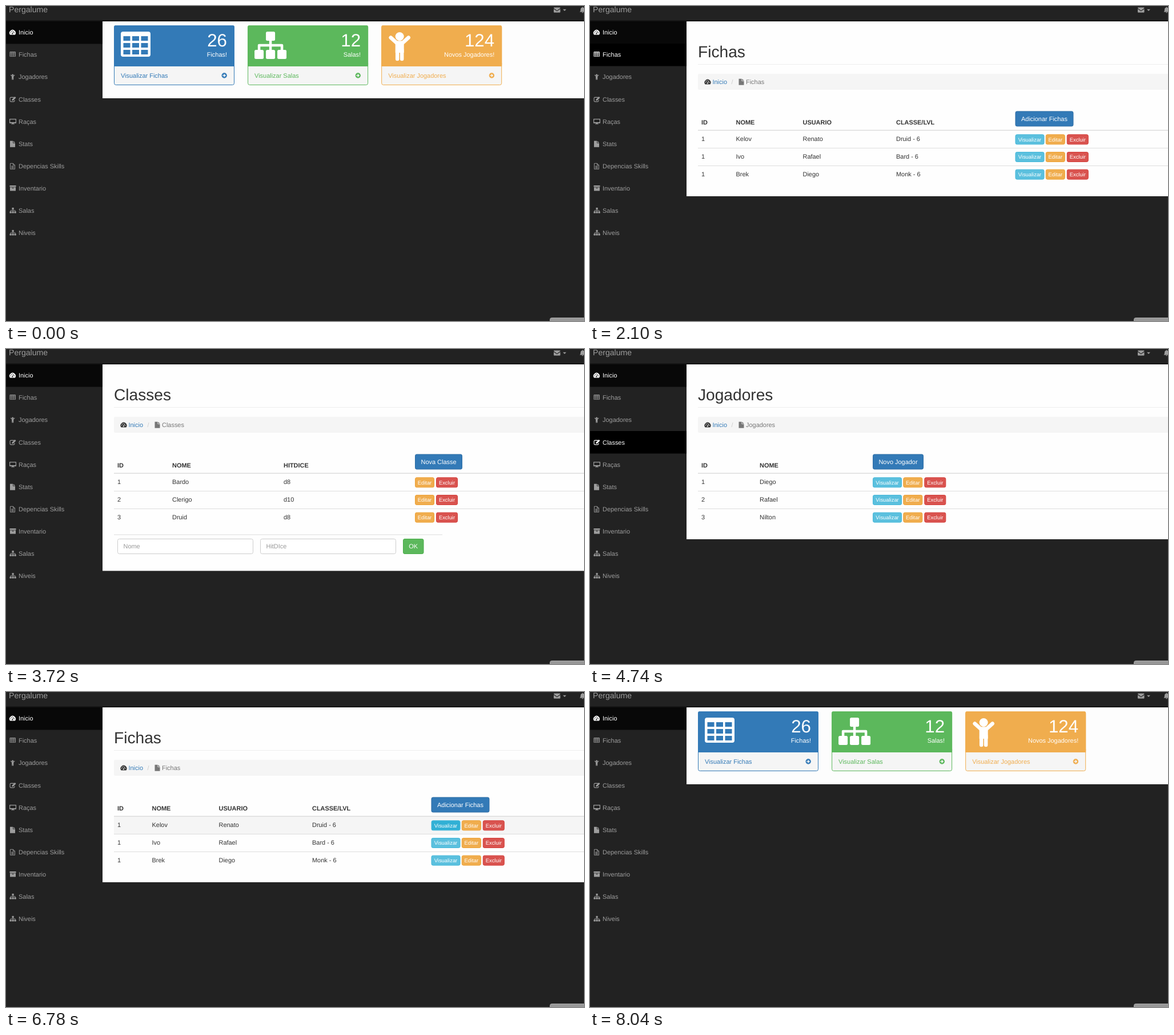
An HTML page that plays this animation: 1012 px wide and 553 px high, repeating every 8820 ms.

```html
<!DOCTYPE html>
<html lang="pt">
<head>
<meta charset="utf-8">
<title>Painel</title>
<style>
  html, body { margin: 0; width: 100%; height: 100%; overflow: hidden; background: #222; }
  svg { display: block; width: 1012px; height: 553px; font-family: "Liberation Sans", Arial, sans-serif; text-rendering: geometricPrecision; }
</style>
</head>
<body>
<svg id="stage" viewBox="0 0 1012 553"></svg>
<script>
const LOOP = 8820;
const BASE = 10.95;
const BLUE = '#337ab7', GREEN = '#5cb85c', ORANGE = '#f0ad4e';

// Each step changes only the listed parts of the state.
const timeline = [
  [0, { page: 'home', hover: -1, row: -1, button: '' }],
  [660, { hover: 2 }],
  [840, { hover: 1 }],
  [2100, { page: 'sheets' }],
  [2160, { hover: 2 }],
  [2880, { page: 'players', hover: 3 }],
  [3720, { page: 'classes', hover: -1 }],
  [4140, { hover: 3 }],
  [4260, { hover: 2 }],
  [4740, { page: 'players', hover: 3 }],
  [4920, { hover: -1 }],
  [5160, { button: 'add' }],
  [5280, { button: '' }],
  [5520, { hover: 3 }],
  [5580, { hover: 2 }],
  [5700, { hover: 1 }],
  [6300, { page: 'sheets', hover: -1, row: 0 }],
  [6540, { button: 'view' }],
  [6720, { button: 'pressed' }],
  [6780, { button: 'view' }],
  [7020, { page: 'detail', row: -1, button: '' }],
  [7440, { hover: 1 }],
  [7560, { hover: 0 }],
  [7920, { page: 'home' }],
  [8040, { hover: -1 }]
];

const text = (x, y, str, fill = '#333', size = BASE, extra = '') =>
  `<text x="${x}" y="${y}" fill="${fill}" font-size="${size}" ${extra}>${str}</text>`;
const rect = (x, y, w, h, fill, extra = '') =>
  `<rect x="${x}" y="${y}" width="${w}" height="${h}" fill="${fill}" ${extra}/>`;
const outlined = (x, y, w, h, fill, border, r = 3) =>
  rect(x + .5, y + .5, w - 1, h - 1, fill, `rx="${r}" stroke="${border}"`);
const CENTER = 'text-anchor="middle"', RIGHT = 'text-anchor="end"', BOLD = 'font-weight="bold"';

const dot = (x, y, r) => `M${x - r} ${y}a${r} ${r} 0 1 0 ${2 * r} 0a${r} ${r} 0 1 0 ${-2 * r} 0z`;
const shape = d => `<path fill-rule="evenodd" d="${d}"/>`;
const line = (d, w) => `<path d="${d}" fill="none" stroke="currentColor" stroke-width="${w}" stroke-linejoin="round"/>`;

function tableIcon() {
  let d = 'M4 0H48Q52 0 52 4V40Q52 44 48 44H4Q0 44 0 40V4Q0 0 4 0z';
  for (const x of [4.5, 20, 35.5]) for (const y of [8, 20, 32]) d += `M${x} ${y}h12v8h-12z`;
  return shape(d);
}

// The first three are drawn at large size; the rest are about 11 units wide.
const icons = {
  table: tableIcon(),
  sitemap: [[20, 0], [0, 32], [20, 32], [40, 32]].map(([x, y]) => rect(x, y, 16, 16, 'currentColor', 'rx="2.5"')).join('') +
    line('M28 14V34M8 34V24H48V34', 4.5),
  child: shape(dot(18.5, 8.5, 7.5)) +
    `<path d="M3 10.500L13 19.500H24L34 10.500M14.500 32V48M22.500 32V48" fill="none" stroke="currentColor" stroke-width="6.500" stroke-linecap="round" stroke-linejoin="round"/>` +
    rect(11, 17, 15, 20, 'currentColor'),
  gauge: shape('M1 9.5A5.5 5.5 0 1 1 10 9.5z' + dot(2.2, 6, .7) + dot(3.2, 3.7, .7) + dot(5.5, 2.6, .7) + dot(8.8, 6, .7) + dot(5.3, 7.5, 1.1) + 'M5.200 6.500L7 3.200L7.700 3.500L6.200 7z'),
  edit: line('M7.500 2H2Q.6 2 .6 3.500V8Q.6 9.500 2 9.500H7Q8.400 9.500 8.400 8V6.500', 1.1) + shape('M4 7.500V5.500L9 .6L11 2.600L6 7.500z'),
  desktop: line('M.6 1.100H11.400V7.500H.6z', 1.2) + shape('M0 6.500H12V8H0zM4.500 8H7.500V9.200H9V10H3V9.200H4.500z'),
  file: shape('M0 0H5V4H9V11H0zM5.800 0L9 3.200H5.800z'),
  fileText: line('M.5 .5H5.500L8.500 3.500V10.500H.5zM5.500 .5V3.500H8.500M2.200 5.300H6.800M2.200 7H6.800M2.200 8.700H6.800', .9),
  archive: shape('M0 0H11V2.600H0zM.5 3.200H10.500V9.500H.5zM4 4.200V5.200H7V4.200z'),
  mail: shape('M0 1.300V1Q0 0 1 0H10.500Q11.500 0 11.500 1V1.300L5.750 5.500zM0 2.700L5.750 6.700L11.500 2.700V8Q11.500 9 10.500 9H1Q0 9 0 8z'),
  bell: shape('M5 0Q5.700 0 5.700 1Q8.500 1.500 8.500 5Q8.500 7.500 10 9H0Q1.500 7.500 1.500 5Q1.500 1.500 4.300 1Q4.300 0 5 0zM3.700 9.400H6.300Q6 10.700 5 10.700Q4 10.700 3.700 9.400z'),
  caret: shape('M0 0H6L3 3z'),
  arrow: shape(dot(4.7, 4.7, 4.7) + 'M1.800 4H4.700L3.600 2.900L4.600 2L7.500 4.700L4.600 7.400L3.600 6.500L4.700 5.400H1.800z')
};
const icon = (name, x, y, color, scale = 1) =>
  `<g transform="translate(${x} ${y}) scale(${scale})" color="${color}" fill="${color}">${icons[name]}</g>`;

const menu = [
  ['Inicio', 'gauge', 6, 1], ['Fichas', 'table', 6.5, .2], ['Jogadores', 'child', 8, .2],
  ['Classes', 'edit', 6.5, 1], ['Raças', 'desktop', 6, 1], ['Stats', 'file', 7, 1],
  ['Depencias Skills', 'fileText', 7, 1], ['Inventario', 'archive', 6.5, 1],
  ['Salas', 'sitemap', 6.5, .2], ['Niveis', 'sitemap', 6.5, .2]
];

function frame({ page, hover }) {
  const shift = page === 'detail' ? -13.5 : 0;
  const gray = '#9d9d9d';
  let out = text(5, 11, 'Pergalume', gray, 14.08) + rect(0, 25.5, 1012, 1.2, '#0c0c0c') +
    icon('mail', 959 + shift, 2.5, gray) + icon('caret', 975 + shift, 5.7, gray) +
    icon('bell', 1004.500 + shift, 1.5, gray) + icon('caret', 1020 + shift, 5.7, gray);
  menu.forEach(([label, name, x, scale], i) => {
    const top = 26.5 + i * 39.14, lit = i === 0 || i === hover;
    const color = lit ? '#fff' : gray;
    if (lit) out += rect(0, Math.round(top), 169, 39.5, i === hover ? '#000' : '#080808');
    out += icon(name, x, top + 14.5, color, scale) + text(22, top + 23.6, label, color);
  });
  return out;
}

const cards = [
  ['Fichas', 26, 'Fichas!', BLUE, 'table'],
  ['Salas', 12, 'Salas!', GREEN, 'sitemap'],
  ['Jogadores', 124, 'Novos Jogadores!', ORANGE, 'child']
];

function home() {
  return rect(169, 27, 843, 135, '#fdfdfd') + cards.map(([label, count, caption, color, name], i) => {
    const x = 189 + i * 234.1;
    return outlined(x, 34, 211, 105, '#f5f5f5', color) +
      rect(x, 34, 211, 72, color, 'rx="3"') + rect(x, 100, 211, 6, color) +
      icon(name, x + (i === 2 ? 13.5 : 12), 45, '#fff') +
      text(x + 198, 70.5, count, '#fff', 31.3, RIGHT) + text(x + 198, 89, caption, '#fff', BASE, RIGHT) +
      text(x + 12, 126, 'Visualizar ' + label, color) + icon('arrow', x + 188.5, 117.3, color);
  }).join('');
}

function button(x, y, w, h, label, fill, border, size = BASE) {
  return outlined(x, y, w, h, fill, border, 2.5) +
    text(x + w / 2, y + h / 2 + size * .36, label, '#fff', size, CENTER);
}

const tables = {
  sheets: {
    title: 'Fichas', height: 307, heads: ['ID', 'NOME', 'USUARIO', 'CLASSE/LVL'], columns: [195, 255.5, 372.5, 536],
    rows: [[1, 'Kelov', 'Renato', 'Druid - 6'], [1, 'Ivo', 'Rafael', 'Bard - 6'], [1, 'Brek', 'Diego', 'Monk - 6']],
    add: ['Adicionar Fichas', 102], actionX: 744.5, view: true
  },
  players: {
    title: 'Jogadores', height: 307, heads: ['ID', 'NOME'], columns: [195, 297],
    rows: [[1, 'Diego'], [2, 'Rafael'], [3, 'Nilton']],
    add: ['Novo Jogador', 89], actionX: 495, view: true
  },
  classes: {
    title: 'Classes', height: 362.5, heads: ['ID', 'NOME', 'HITDICE'], columns: [195, 291, 486],
    rows: [[1, 'Bardo', 'd8'], [2, 'Clerigo', 'd10'], [3, 'Druid', 'd8']],
    add: ['Nova Classe', 83], actionX: 716, view: false
  }
};

function actions(x, y, withView, state) {
  const fill = { view: '#31b0d5', pressed: '#269abc' }[state] || '#5bc0de';
  const editX = withView ? x + 53.3 : x;
  return (withView ? button(x, y, 51, 18, 'Visualizar', fill, '#46b8da', 9.4) : '') +
    button(editX, y, 34, 18, 'Editar', ORANGE, '#eea236', 9.4) +
    button(editX + 37, y, 38, 18, 'Excluir', '#d9534f', '#d43f3a', 9.4);
}

function tablePage(table, state) {
  const { title, height, heads, columns, rows, add, actionX, view } = table;
  let out = rect(169, 27, 843, height, '#fefefe') + text(189, 90, title, '#333', 28.15) +
    rect(189, 102, 823, 1, '#eee') + rect(189, 119, 830, 28, '#f5f5f5', 'rx="3"') +
    icon('gauge', 200.5, 128, '#333') + text(214.5, 137, 'Inicio', BLUE) + text(247.5, 137, '/', '#ccc') +
    icon('file', 260.5, 127.7, '#777') + text(273, 137, title, '#777');
  heads.forEach((head, i) => out += text(columns[i], 207.5, head, '#333', BASE, BOLD));
  out += button(actionX, 184.5, add[1], 27, add[0], state.button === 'add' ? '#286090' : BLUE, '#2e6da4');
  rows.forEach((cells, r) => {
    const y = 219 + r * 30.7;
    if (r === state.row) out += rect(189, y, 823, 30, '#f5f5f5');
    out += rect(189, r ? Math.round(y - .5) : 217.5, 823, r ? 1 : 1.5, '#ddd');
    cells.forEach((cell, i) => out += text(columns[i], y + 18.4, cell));
    out += actions(actionX, y + 6.3, view, r === 0 && state.button);
  });
  return out;
}

function classForm() {
  const input = (x, hint) => outlined(x, 333, 238, 27, '#fff', '#ccc') + text(x + 10.5, 350.3, hint, '#999');
  return rect(189, 325.5, 575, 1, '#ddd') + input(195, 'Nome') + input(445, 'HitDIce') +
    button(695, 333, 36.5, 27, 'OK', GREEN, '#4cae4c');
}

function detail() {
  let out = rect(169, 27, 843, 526, '#fcfcfc') + outlined(189, 34, 840, 540, '#fcfcfc', '#ddd') +
    rect(190, 35, 822, 79, '#f5f6f6') + rect(190, 114, 822, 1, '#ddd');
  [[201.5, 'Kelov', 'Renato'], [426, 'Druid', 'Tiefling'], [501, 'Level: 6', 'XP: 2600']].forEach(([x, top, bottom]) =>
    out += text(x, 74.5, top, '#333', 18.77) + text(x, 95, bottom, '#333', 18.77));
  out += text(653.5, 138.5, '.col-md-1') + text(728.5, 138.5, '.col-md-1');
  ['STR', 'DEX', 'CON', 'WIS'].forEach((name, i) => {
    const y = 127 + i * 116.7;
    out += outlined(201, y, 89, 101, '#fdfdfd', '#ddd') + rect(202, y + 16.5, 87, 83, '#f5f6f6') +
      rect(202, y + 67, 87, 1, '#ddd') + text(245, y + 12.3, name, '#333', BASE, CENTER) +
      text(222, y + 52.5, '12', '#333', 30.5) + text(247, y + 88.7, '5', BLUE, BASE, CENTER);
  });
  return out;
}

function cornerTab(page) {
  return page === 'detail'
    ? outlined(939, 547, 90, 20, '#fafafa', '#ccc')
    : outlined(952, 547, 80, 20, '#989898', '#aaa');
}

function picture(state) {
  const { page } = state;
  const content = page === 'home' ? home() : page === 'detail' ? detail() : tablePage(tables[page], state);
  return frame(state) + content + (page === 'classes' ? classForm() : '') + cornerTab(page);
}

const stage = document.getElementById('stage');
let shown = '';

function draw() {
  const time = performance.now() % LOOP;
  const state = Object.assign({}, ...timeline.filter(([start]) => start <= time).map(([, change]) => change));
  const key = JSON.stringify(state);
  if (key !== shown) {
    shown = key;
    stage.innerHTML = picture(state);
  }
  requestAnimationFrame(draw);
}
draw();
</script>
</body>
</html>
```
